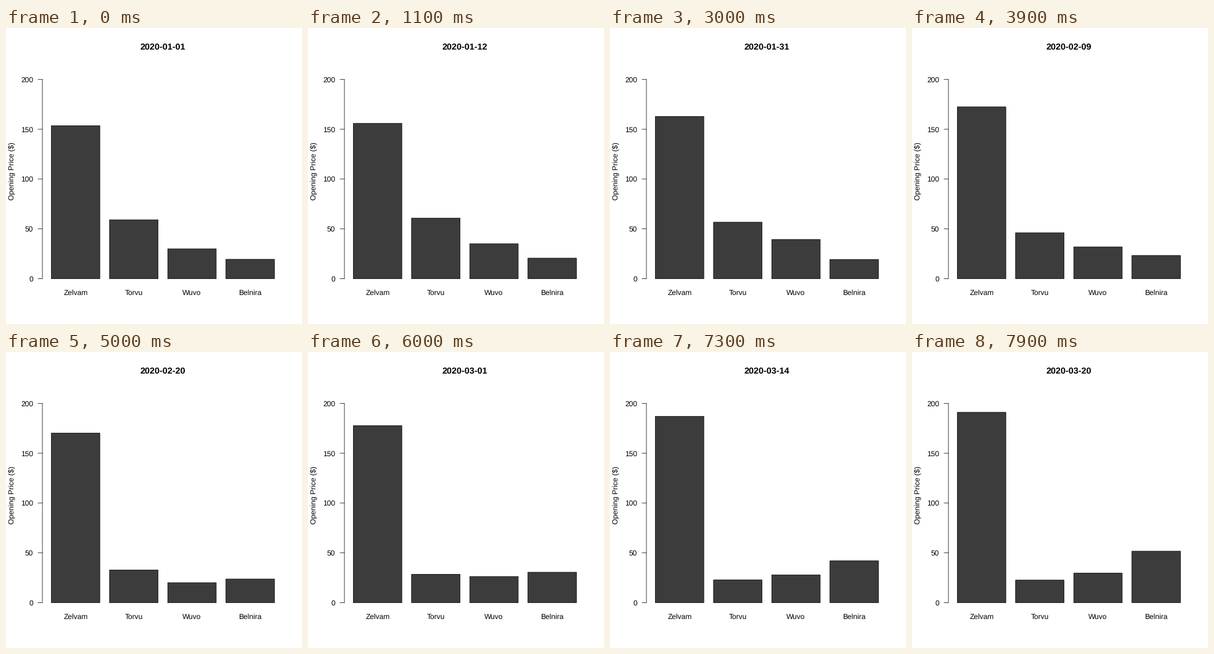
Animation of 480 by 480 pixels, one loop 8 s. Source, as a matplotlib script:

```python
import numpy as np
import matplotlib.pyplot as plt
from matplotlib.animation import FuncAnimation
from matplotlib.patches import Rectangle

plt.rcParams["font.family"] = "Liberation Sans"
plt.rcParams["text.hinting"] = "none"

SIZE, DPI = 480, 72
FRAMES, INTERVAL = 80, 100
LEFT, BASE = 59.04, 406.56       # plot corner in pixels
UNIT = 390.72 / 4.968            # bar width
SCALE = 347.52 / 215             # pixels per dollar
START = np.datetime64("2020-01-01")
STROKE = dict(lw=0.75, snap=False)

# Opening prices at the main turning points, linear in between
DAYS = [0, 12, 21, 34, 39, 43, 50, 53, 60, 67, 79]
PRICES = {
    "Zelvam": [153.5, 156, 157.7, 165, 172.4, 168, 170.2, 195, 177.7, 183, 191],
    "Torvu": [59.1, 61, 56, 57, 46.1, 46, 32.8, 22, 28.5, 23, 22.7],
    "Wuvo": [30, 35.5, 36.8, 40.5, 31.9, 33, 20.1, 16, 26.3, 26, 29.7],
    "Belnira": [19.5, 20.8, 20.6, 18.8, 23.3, 28.5, 23.8, 28, 30.6, 32.3, 51.7],
}

fig = plt.figure(figsize=(SIZE / DPI, SIZE / DPI), dpi=DPI, facecolor="white")
ax = fig.add_axes([0, 0, 1, 1])
ax.set(xlim=(0, SIZE), ylim=(SIZE, 0))
ax.axis("off")


def label(x, y, text, size=12, ha="center", **kw):
    return ax.text(x, y, text, fontsize=size, ha=ha, va="baseline", **kw)


def line(xs, ys):
    ax.plot(xs, ys, color="black", solid_capstyle="round", **STROKE)


def price_y(value):
    return BASE - value * SCALE


line([LEFT, LEFT], [price_y(0), price_y(200)])
for tick in range(0, 201, 50):
    y = price_y(tick)
    line([LEFT - 7.2, LEFT], [y, y])
    label(LEFT - 14.8, y + 4.3, str(tick), ha="right")
label(14, 231.8, "Opening Price ($)", rotation=90, rotation_mode="anchor")
title = label(254.2, 35, "", size=14.4, weight="bold")

bars = []
for i, name in enumerate(PRICES):
    x = LEFT + (0.184 + 1.2 * i) * UNIT
    bar = Rectangle((x, BASE), UNIT, 0, fc="#3c3c3c", ec="black", **STROKE)
    bars.append(ax.add_patch(bar))
    label(x + UNIT / 2, 433, name)


def update(day):
    title.set_text(str(START + day))
    for bar, prices in zip(bars, PRICES.values()):
        bar.set_height(-SCALE * np.interp(day, DAYS, prices))
    return [title, *bars]


anim = FuncAnimation(fig, update, frames=FRAMES, interval=INTERVAL,
                     repeat=True, repeat_delay=0)
plt.show()
```
